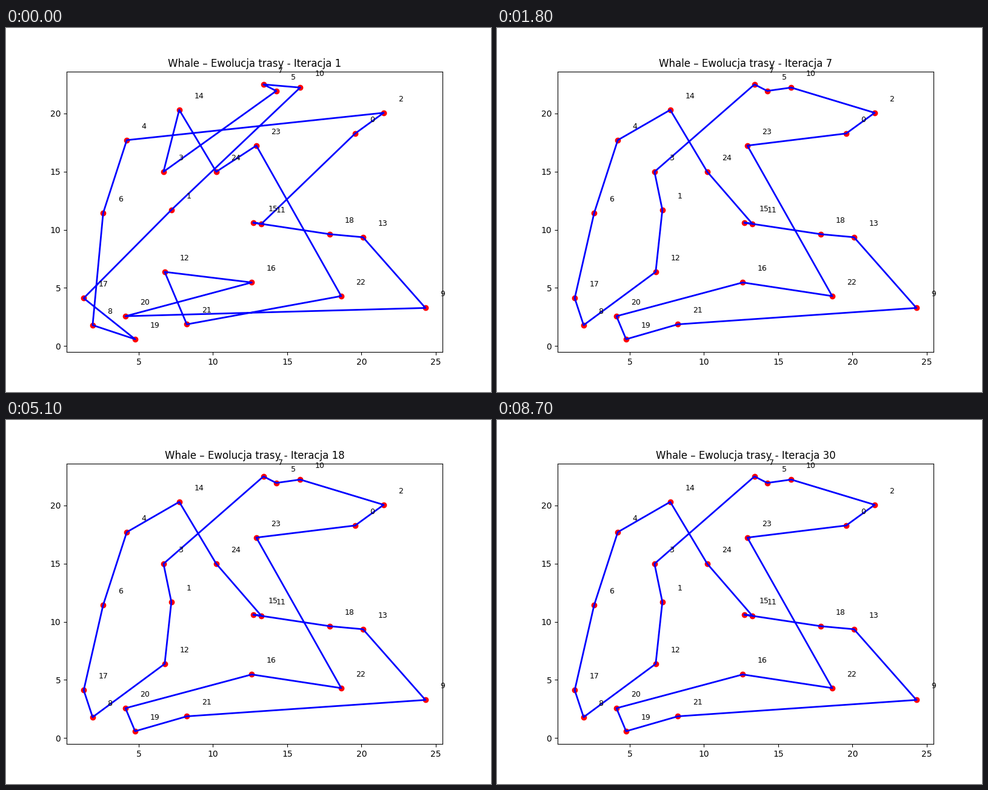
Animation of 800 by 600 pixels, one loop 9000 ms. Source, as a matplotlib script:

```python
import numpy as np
import matplotlib.pyplot as plt
from matplotlib.animation import FuncAnimation

STEPS = 30
INTERVAL = 300

cities = np.array([
    (19.57, 18.28), (7.20, 11.71), (21.49, 20.06), (6.67, 14.99), (4.20, 17.71),
    (14.26, 21.94), (2.61, 11.45), (13.40, 22.50), (1.90, 1.80), (24.30, 3.28),
    (15.87, 22.23), (13.26, 10.51), (6.75, 6.38), (20.10, 9.36), (7.73, 20.31),
    (12.73, 10.61), (12.61, 5.47), (1.30, 4.12), (17.87, 9.62), (4.76, 0.59),
    (4.11, 2.57), (8.24, 1.87), (18.63, 4.30), (12.92, 17.24), (10.22, 14.99),
])


def relocate(route, moves):
    """Take cities out of the route and put them back after their new anchors."""
    moved = {city for group in moves.values() for city in group}
    result = []
    for city in route:
        if city not in moved:
            result += [city, *moves.get(city, ())]
    return result


first = [15, 18, 13, 9, 20, 16, 12, 21, 22, 23, 24, 14, 3,
         5, 7, 10, 1, 17, 19, 8, 6, 4, 2, 0, 11]
better = relocate(first, {9: (21, 19), 23: (0, 2), 5: (10,), 7: (3,),
                          1: (12,), 8: (17,), 4: (14, 24)})
best = relocate(better, {2: (10,)})


def route_at(iteration):
    if iteration == 1:
        return first
    return better if iteration < 5 else best


def closed(route):
    return cities[route + route[:1]].T


plt.rcParams["font.family"] = "DejaVu Sans"
fig, ax = plt.subplots(figsize=(8, 6), dpi=100)
ax.scatter(*cities.T, c="red")
line, = ax.plot(*closed(first), color="blue", linewidth=2)
for i, (x, y) in enumerate(cities):
    ax.text(x + 1, y + 1, str(i), fontsize=9)
title = ax.set_title("")


def update(frame):
    iteration = frame + 1
    line.set_data(*closed(route_at(iteration)))
    title.set_text(f"Whale – Ewolucja trasy - Iteracja {iteration}")
    return line, title


anim = FuncAnimation(fig, update, frames=STEPS, interval=INTERVAL,
                     repeat=True, repeat_delay=0)
plt.show()
```
